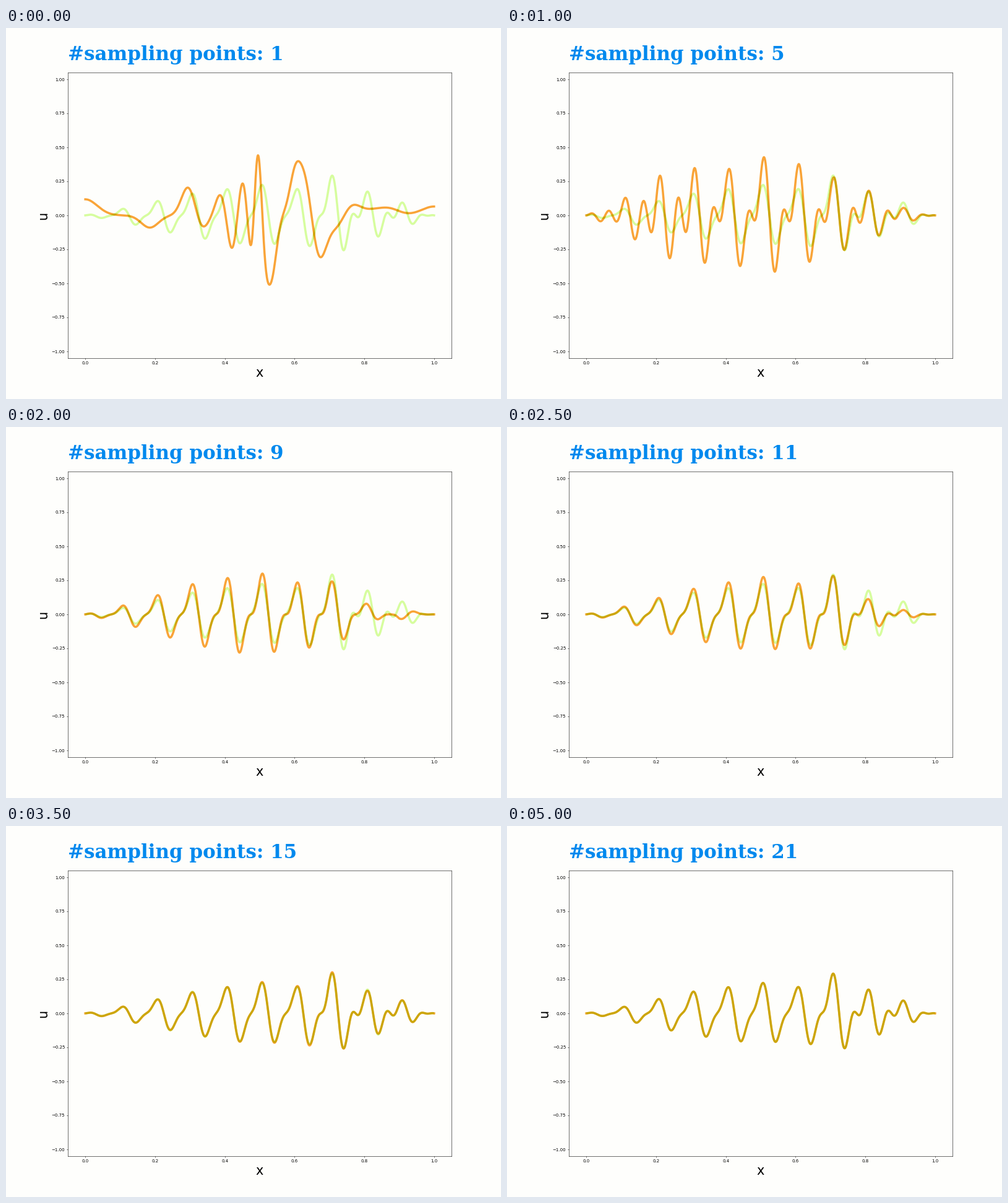
Animation, 800 px wide and 600 px high, one loop 5.5 s. Source, as a matplotlib script:

```python
import matplotlib.pyplot as plt
import numpy as np
from matplotlib.animation import FuncAnimation
from matplotlib.path import Path

W, H, DPI = 800, 600, 50
PT = 72 / DPI                      # points per pixel
LINE = 3.5
PAPER, INK = "#fefefc", "#0089ee"
PALE, ORANGE, GOLD = "#d6fd9e", "#f9a438", "#cba60c"
UNIT = np.array([[1.1 / 620], [2.1 / 462]])   # data units per pixel
X = np.linspace(0, 1, 900)


def packet(heights, skews):
    """Ten cycles under an envelope; the second harmonic makes them lean."""
    a = np.interp(X, (0, .1, .3, .5, .6, .7, .8, .9, 1), (0, *heights, 0))
    r = np.interp(X, (.2, .4, .65, .85), skews)
    theta = 20 * np.pi * X
    return a * (np.cos(theta) + r * np.sin(2 * theta))


def bumps(*pairs):
    """Gaussian bumps (place, height), narrower towards the middle."""
    y = np.zeros_like(X)
    for x, height in pairs:
        width = .01 + .05 * abs(x - .48)
        y += height * np.exp(-.5 * ((X - x) / width) ** 2)
    return y


truth = packet((.037, .135, .195, .16, .235, .12, .064), (.35, .32, .35, .85))

waves = {
    1: bumps((0, .118), (.185, -.09), (.295, .21), (.335, -.1), (.388, .16),
             (.42, -.26), (.451, .26), (.478, -.385), (.494, .59),
             (.518, -.33), (.537, -.36), (.602, .3), (.63, .26),
             (.672, -.31), (.72, -.09), (.765, .08), (.82, .03),
             (.87, .05), (1, .065)),
    5: packet((.04, .165, .285, .25, .17, .1, .03), (2, .7, .8, 1.3)),
    7: packet((.07, .14, .25, .2, .22, .165, .036), (.6, .4, .45, .9)),
    9: packet((.05, .18, .24, .18, .2, .07, -.03), (.35, .45, .5, .4)),
    13: packet((.04, .13, .21, .17, .255, .105, .07), (.3, .35, .45, .75)),
    17: packet((.04, .135, .185, .15, .225, .125, .065), (.3, .3, .35, .85)),
    21: truth,
}
for n in (3, 11, 15, 19):
    waves[n] = (waves[n - 2] + waves[n + 2]) / 2


def band(y):
    """Outline of the stroke along a wave."""
    p = np.array([X, y]) / UNIT
    dx, dy = np.gradient(p, axis=1)
    side = np.array([-dy, dx]) / np.hypot(dx, dy) * LINE / 2
    return Path((np.hstack([p + side, (p - side)[:, ::-1]]) * UNIT).T)


fig = plt.figure(figsize=(W / DPI, H / DPI), dpi=DPI, facecolor=PAPER)
ax = fig.add_subplot(facecolor=PAPER)
ax.set(xlim=(-.05, 1.05), ylim=(-1.05, 1.05))
ax.set_xlabel("x", fontsize=30)
ax.set_ylabel("u", fontsize=30)
title = fig.text(100 / W, 1 - 52 / H, "", color=INK, family="DejaVu Serif",
                 weight="bold", fontsize=31 * PT, va="baseline")

ax.plot(X, truth, color=PALE, lw=LINE * PT)
wave, = ax.plot(X, truth, color=ORANGE, lw=LINE * PT)
overlap, = ax.plot(X, truth, color=GOLD, lw=LINE * PT)


def draw(i):
    n = 2 * i + 1
    wave.set_ydata(waves[n])
    overlap.set_clip_path(band(waves[n]), ax.transData)
    title.set_text(f"#sampling points: {n}")
    return wave, overlap, title


anim = FuncAnimation(fig, draw, frames=len(waves), interval=500, repeat=True)
plt.show()
```
